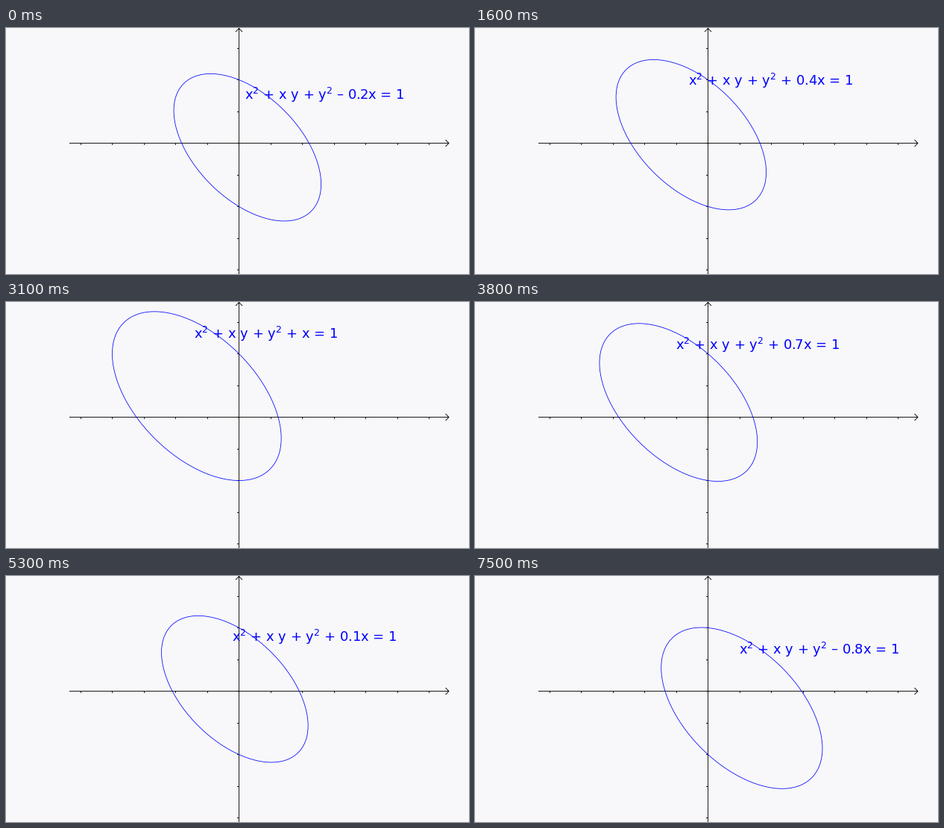
A matplotlib script that plays this animation: 621 px wide and 330 px high, repeating every 7700 ms.

```python
import numpy as np
import matplotlib.pyplot as plt
from matplotlib.animation import FuncAnimation

W, H, DPI = 621, 330, 100
PX = 72 / DPI                      # one pixel in points
OX, OY, UNIT = 312.5, 154.5, 85    # origin and scale in pixels
BLUE = "#0000ff"
TICK = 100                         # ms per frame

# The coefficient k rises from -0.2 to 1, then falls to -0.8.
TENTHS = [*range(-2, 11), *range(9, -9, -1)]
HOLDS = [int(c) for c in "3323232322" "3322323232" "33232322322"]
STEPS = np.repeat(TENTHS, HOLDS)

plt.rcParams["font.family"] = "DejaVu Sans"
fig = plt.figure(figsize=(W / DPI, H / DPI), dpi=DPI, facecolor="#f8f8fa")
ax = fig.add_axes([0, 0, 1, 1])
ax.set_xlim(0, W)
ax.set_ylim(H, 0)
ax.axis("off")


def stroke(xs, ys, color="black", width=0.9):
    return ax.plot(xs, ys, color=color, lw=width * PX, snap=False,
                   solid_capstyle="butt")[0]


def draw_axes():
    stroke([85, 594], [OY, OY])
    stroke([OX, OX], [0, H])
    stroke([589.5, 594, 589.5], [OY - 4.5, OY, OY + 4.5])
    stroke([OX - 4.5, OX, OX + 4.5], [5, 0.5, 5])
    for n in range(-5, 7):
        x = np.floor(OX + n * UNIT / 2) + 0.5
        stroke([x, x], [OY, OY + 2.5])
    for n in range(-4, 4):
        y = np.floor(OY - n * UNIT / 2) + 0.5
        stroke([OX - 2.5, OX], [y, y])


def conic(k):
    """Centre and half axes of x^2 + xy + y^2 + kx = 1."""
    r = 1 + k * k / 3
    return -2 * k / 3, k / 3, np.sqrt(2 * r), np.sqrt(2 * r / 3)


def place(k, u, v):
    """Pixels of a point given along the long and short axis."""
    cx, cy, _, _ = conic(k)
    x = cx + (u + v) / np.sqrt(2)
    y = cy + (v - u) / np.sqrt(2)
    return OX + UNIT * x, OY - UNIT * y


def equation(tenths):
    term = ""
    if tenths:
        sign = "+" if tenths > 0 else "–"
        size = "" if abs(tenths) == 10 else f"{abs(tenths) / 10:.1f}"
        term = f" {sign} {size}x"
    return (r"$\mathregular{x^2}$ + x y + $\mathregular{y^2}$"
            + term + " = 1")


draw_axes()
curve = stroke([], [], BLUE, 0.78)
label = ax.text(0, 0, "", color=BLUE, size=17.85 * PX, va="baseline")
angle = np.linspace(0, 2 * np.pi, 361)


def update(frame):
    tenths = int(STEPS[frame])
    k = tenths / 10
    _, _, a, b = conic(k)
    curve.set_data(*place(k, a * np.cos(angle), b * np.sin(angle)))
    x, y = place(k, -a / 2, 0.85 * b - 20 / UNIT)
    label.set_position((x + 11, y + 6.3))
    label.set_text(equation(tenths))
    return curve, label


anim = FuncAnimation(fig, update, frames=len(STEPS), interval=TICK,
                     init_func=lambda: update(0), repeat=True,
                     repeat_delay=0, blit=False)
plt.show()
```
